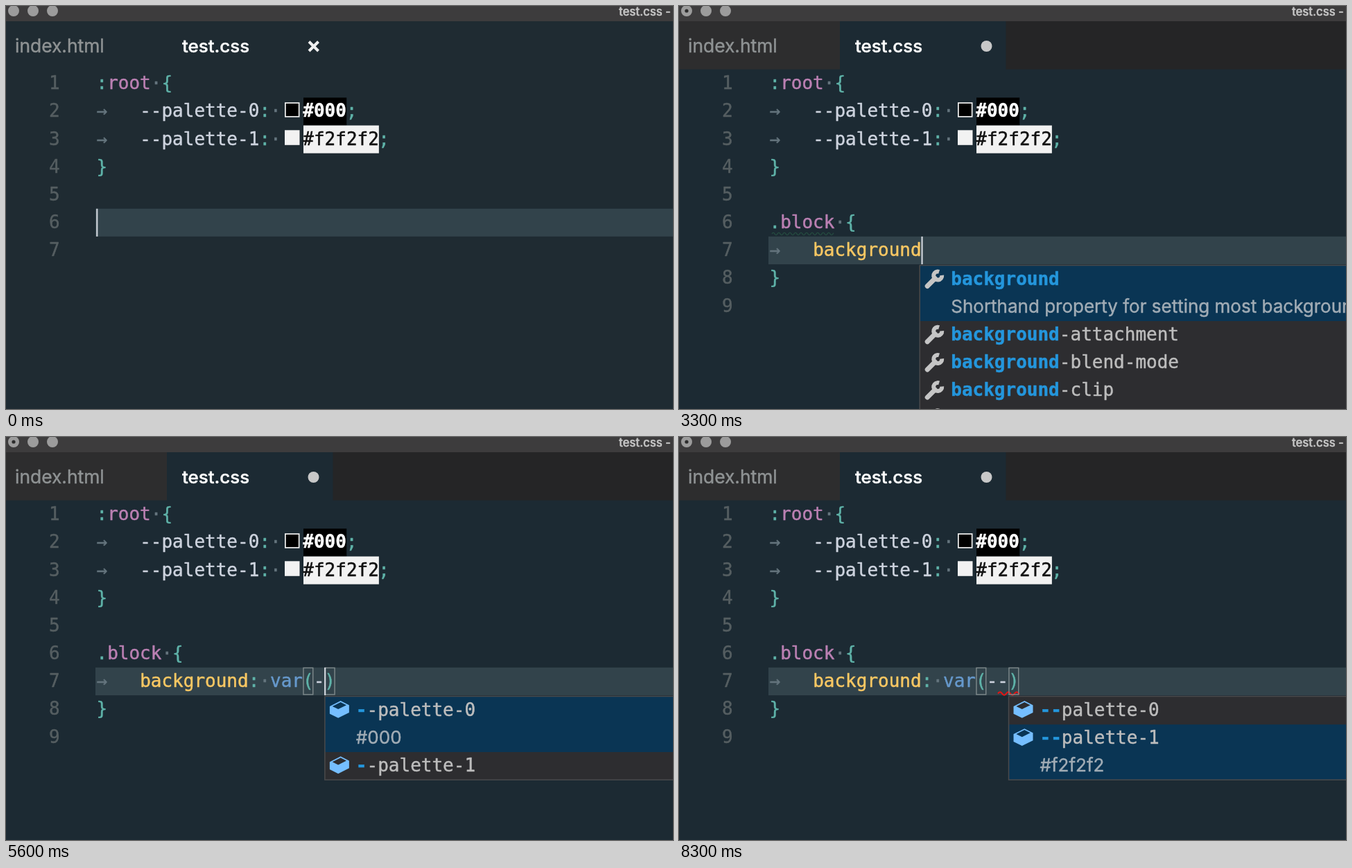
Recreate the animation shown at these times as an HTML page with a canvas. Size 962x582 px, loop 8.5 s.

```html
<!DOCTYPE html>
<html lang="en">
<head>
<meta charset="utf-8">
<title>test.css</title>
<style>
  html, body { margin: 0; width: 100%; height: 100%; overflow: hidden; background: #1f2b32; }
  canvas { display: block; }
</style>
</head>
<body>
<canvas id="stage" width="962" height="582"></canvas>
<script>
const ctx = document.getElementById('stage').getContext('2d');
const LOOP = 8500, W = 962, H = 582;
const LEFT = 131, CHAR = 15.66, LINE = 40.15, FIRST = 91.5;
const MONO = '26px "DejaVu Sans Mono", monospace';
const UI = 'Inter, sans-serif';
const C = {
  fg: '#cdd3de', teal: '#5fb3a9', pink: '#bb80b3', yellow: '#fac863', blue: '#6699cc',
  faint: '#65757e', gutter: '#555e61', line: '#32434b', caret: '#cfd4db', box: '#7f8a8c',
  panel: '#2d2d30', edge: '#4a4a4c', selected: '#0a3554', item: '#bdbdbd', match: '#2496dc',
  icon: '#c5c5c5', cube: '#75beff', red: '#e51414', green: '#24493f'
};

// Typing schedule in ms, one entry per key
const selector = '.block {';
const selectorKeys = [400, 500, 600, 700, 800, 900, 1200, 1500];
const enterKey = 1800;
const rule = 'background: var(--';
const ruleKeys = [2200, 2400, 2500, 2600, 2700, 2800, 2900, 3000, 3100, 3200, 3400, 3600,
  4700, 4900, 5000, 5200, 5500, 5700];
const allKeys = [0, ...selectorKeys, enterKey, ...ruleKeys];

const properties = ['backface-visibility', 'background', 'background-attachment',
  'background-blend-mode', 'background-clip', 'background-color'];
const values = ['var()', 'violet', 'blueviolet', 'darkviolet', 'palevioletred'];

const typed = (keys, t) => keys.filter(k => k <= t).length;
const lineTop = n => FIRST + (n - 1) * LINE;
const colX = col => LEFT + col * CHAR;

function rect(x, y, w, h, color) {
  ctx.fillStyle = color;
  ctx.fillRect(x, y, w, h);
}

// A hairline outline gives the slightly heavy look of smoothed screen type
function text(str, x, y, color, font = MONO) {
  ctx.font = font;
  ctx.fillStyle = ctx.strokeStyle = color;
  ctx.lineWidth = 0.45;
  ctx.lineJoin = 'round';
  ctx.fillText(str, x, y);
  ctx.strokeText(str, x, y);
}

function disc(x, y, r, color) {
  ctx.fillStyle = color;
  ctx.beginPath();
  ctx.arc(x, y, r, 0, Math.PI * 2);
  ctx.fill();
}

function polygon(points, color) {
  ctx.fillStyle = color;
  ctx.beginPath();
  points.forEach(([x, y]) => ctx.lineTo(x, y));
  ctx.fill();
}

function stroke(points, color, width) {
  ctx.strokeStyle = color;
  ctx.lineWidth = width;
  ctx.beginPath();
  points.forEach(([x, y], i) => i ? ctx.lineTo(x, y) : ctx.moveTo(x, y));
  ctx.stroke();
}

// Segments are [string, color] pairs laid out on the character grid
function code(line, col, ...segments) {
  for (const [str, color] of segments) {
    text(str, colX(col) - 0.5, lineTop(line) + 28.8, color);
    col += str.length;
  }
}

function squiggle(x1, x2, y, color, period, height, width) {
  const points = [];
  for (let x = x1; x <= x2; x++) {
    points.push([x, y - height * Math.sin((x - x1) / period * Math.PI * 2)]);
  }
  stroke(points, color, width);
}

function bracketBox(line, col) {
  ctx.strokeStyle = C.box;
  ctx.lineWidth = 1.4;
  ctx.lineJoin = 'miter';
  ctx.strokeRect(colX(col) + 0.4, lineTop(line) + 1, 13.8, LINE - 1.6);
}

function wrench(x, y) {
  ctx.lineCap = 'round';
  stroke([[x + 4, y + 11], [x + 15, y]], C.icon, 7);
  ctx.lineCap = 'butt';
  ctx.strokeStyle = C.icon;
  ctx.lineWidth = 6;
  ctx.beginPath();
  ctx.arc(x + 19, y - 4, 6, -0.1, Math.PI * 1.6);
  ctx.stroke();
}

// Open box drawn on a 16 by 14 unit grid
function cube(x, y, hollow) {
  const scaled = points => points.map(([u, v]) => [x + u * 1.75, y - 12.5 + v * 1.75]);
  polygon(scaled([[0, 10.7], [0, 4.5], [9, 0], [16, 3.5], [16, 9.7], [7, 14.2]]), C.cube);
  polygon(scaled([[9, 1.1], [2.2, 4.5], [7, 6.9], [13.8, 3.5]]), hollow);
}

function popup(x, items, chosen, match, detail, icon) {
  const top = 374;
  const bottom = Math.min(top + (items.length + 1) * 40.2, H + 10);
  rect(x, top, W - x + 10, bottom - top, C.panel);
  rect(x, top + 1 + chosen * 40.2, W - x, 80, C.selected);
  ctx.strokeStyle = C.edge;
  ctx.lineWidth = 1.5;
  ctx.strokeRect(x, top + 0.5, W - x + 10, bottom - top);
  items.forEach((item, i) => {
    const y = 393.5 + (i + (i > chosen)) * 40.15;
    const hit = item.startsWith(match) ? match : '';
    icon(x + 7, y, i === chosen ? C.selected : C.panel, item);
    text(hit, x + 45, y + 9, C.match, 'bold ' + MONO);
    text(item.slice(hit.length), x + 45 + hit.length * CHAR, y + 9, C.item);
    if (i === chosen) text(detail, x + 45, y + 49.5, '#a1acb5', '26px ' + UI);
  });
}

function valueIcon(x, y, back, item) {
  if (item === 'var()') cube(x, y, back);
  else rect(x + 3, y - 10, 21, 21, item);
}

function suggestions(t, count) {
  const x = colX(4 + count);
  const match = rule.slice(0, typed(ruleKeys, t - 100));
  if (count <= 10) {
    const late = match.length > 4;
    popup(x - 3, late ? properties.slice(1) : properties, 0, match,
      late ? 'Shorthand property for setting most background properties'
           : "Determines whether or not the 'back' side of a transformed element", wrench);
  } else if (count < 16) {
    popup(x, values, 0, rule.slice(12, count), 'Evaluates the value of a custom variable.', valueIcon);
  } else {
    const chosen = t >= 6600 ? 1 : 0;
    popup(x, ['--palette-0', '--palette-1'], chosen, rule.slice(16, count),
      ['#000', '#f2f2f2'][chosen], cube);
  }
}

function chrome(dirty, open) {
  rect(0, 0, W, H, open ? '#1c2a33' : '#1f2b32');
  if (open) {
    rect(0, 22, 232, 69.5, '#2d2d2e');
    rect(471.5, 22, W, 69.5, '#252526');
  }
  rect(0, 0, W, 22, '#3d3c3d');
  for (const x of [11, 39, 67]) disc(x, 7, 8, '#9c9c9c');
  if (dirty) disc(11, 7, 2.6, '#2c2c2c');
  text('test.css -', 884, 14, '#c6c6c6', '500 16.7px ' + UI);
  text('index.html', 13, 67, '#8f9394', '26.4px ' + UI);
  text('test.css', 254, 67, '#ffffff', '500 25.9px ' + UI);
  if (dirty) {
    disc(443.5, 58, 8, '#c8c8c8');
  } else {
    stroke([[437, 51.5], [450.5, 65]], '#f0f0f0', 4);
    stroke([[450.5, 51.5], [437, 65]], '#f0f0f0', 4);
  }
}

function paletteLine(line, index, hex, color, font) {
  const top = lineTop(line), end = 429 + hex.length * 15.55;
  code(line, 0, ['→', C.faint]);
  code(line, 4, [`--palette-${index}`, C.fg], [':', C.teal], ['·', C.faint]);
  rect(402, top + 7.5, 21.5, 21.5, '#f2f2f2');
  if (hex === '#000') rect(403.7, top + 9.2, 18.1, 18.1, '#000');
  rect(429, top + 0.7, end - 429, LINE, hex);
  text(hex, 428.3, top + 28.8, color, font);
  text(';', end - 0.5, top + 28.8, C.teal);
}

function ruleText(count) {
  code(7, 0, ['→', C.faint]);
  const part = (a, b) => rule.slice(a, Math.min(b, count));
  code(7, 4,
    [part(0, 10), count >= 10 ? C.yellow : C.fg],
    [part(10, 11), C.teal],
    [count > 11 ? '·' : '', C.faint],
    [part(12, 15), count >= 15 ? C.blue : C.fg],
    [part(15, 16), C.teal],
    [part(16, 18), C.fg],
    [count >= 16 ? ')' : '', C.teal]);
}

function draw(t) {
  const head = typed(selectorKeys, t), count = typed(ruleKeys, t);
  const entered = t >= enterKey;
  const open = count > 0 && count !== 11 && count !== 12;
  const current = entered ? 7 : 6;
  const caretCol = entered ? 4 + count : head;

  chrome(head > 0, open);
  rect(129, lineTop(current) + 0.5, W, LINE, C.line);
  for (let n = 1; n <= (entered ? 9 : 7); n++) text(n, 62, lineTop(n) + 28.8, C.gutter);

  code(1, 0, [':', C.teal], ['root', C.pink], ['·', C.faint], ['{', C.teal]);
  paletteLine(2, 0, '#000', '#fff', 'bold ' + MONO);
  paletteLine(3, 1, '#f2f2f2', '#111', MONO);
  code(4, 0, ['}', C.teal]);

  code(6, 0,
    [selector.slice(0, Math.min(1, head)), C.teal],
    [selector.slice(1, Math.max(1, Math.min(6, head))), C.pink],
    [head > 6 ? '·' : '', C.faint],
    [head > 7 ? (entered ? '{' : '{}') : '', C.teal]);

  if (entered) {
    ruleText(count);
    code(8, 0, ['}', C.teal]);
    if (t >= 2000 && t < 3600) squiggle(134, 223, 329, C.green, 8, 1.8, 1.3);
    if (t >= 3900 && t < 5000) squiggle(131, 146, 411, C.red, 12, 2.2, 2);
    if (t >= 6000) squiggle(460, 491, 370.5, C.red, 12, 2.2, 2);
  }

  if (!entered && head === 8) {
    bracketBox(6, 7);
    bracketBox(6, 8);
  }
  if (count >= 16) {
    bracketBox(7, 19);
    bracketBox(7, 4 + count);
  }

  if (open) suggestions(t, count);

  const lastKey = allKeys[typed(allKeys, t) - 1];
  if ((t - lastKey) % 1000 < 500) {
    rect(colX(caretCol) - 0.8, lineTop(current) + 0.5, 2.2, LINE, C.caret);
  }
}

const start = performance.now();
function tick() {
  draw((performance.now() - start) % LOOP);
  requestAnimationFrame(tick);
}
tick();
</script>
</body>
</html>
```
